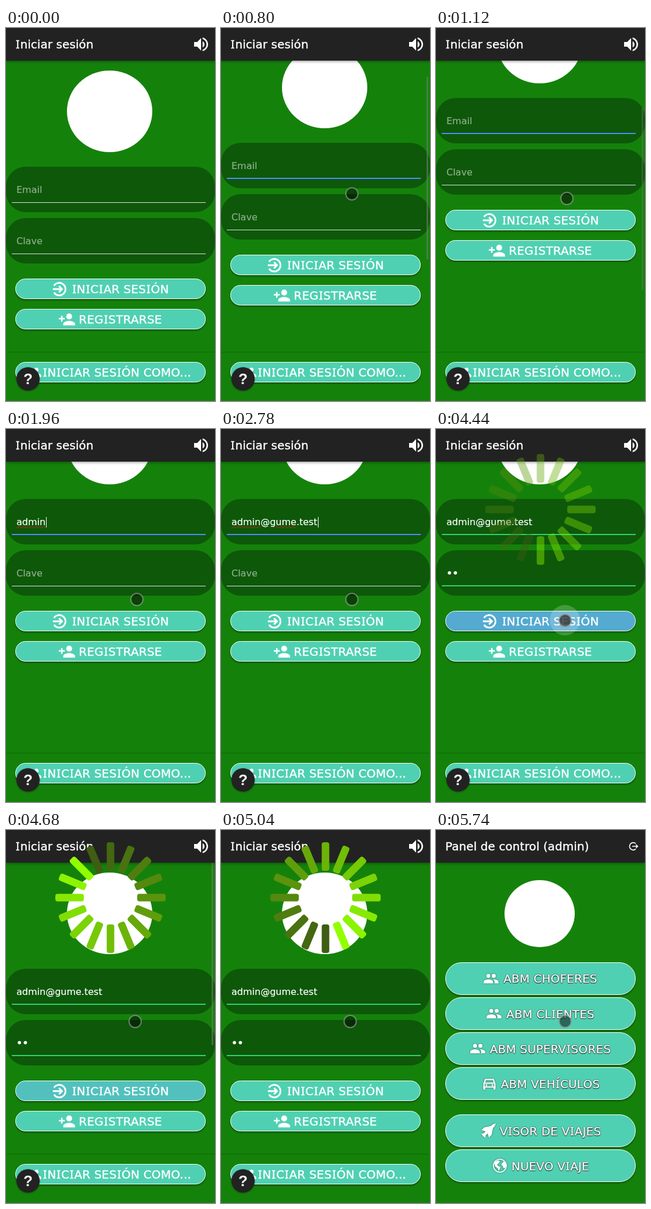
An HTML page that plays this animation: 360 px wide and 640 px high, repeating every 5.78 s.

```html
<!DOCTYPE html>
<html lang="es">
<head>
<meta charset="utf-8">
<title>Iniciar sesión</title>
<style>
html, body { margin: 0; width: 100%; height: 100%; overflow: hidden; background: #14820a; }
body { position: relative; font: 16px "DejaVu Sans", Verdana, sans-serif; color: #fff; }
div { position: absolute; box-sizing: border-box; }
svg { flex: none; overflow: visible; fill: #fff; }
.page { width: 360px; height: 640px; overflow: hidden; background: #14820a; }
.bar { width: 360px; height: 56px; padding-left: 16px; background: #222; font-size: 20px; line-height: 57px; letter-spacing: .08px;
  white-space: pre; box-shadow: 0 2px 4px #0005; -webkit-text-stroke: .4px; }
.bar svg { position: absolute; }
.logo { border-radius: 50%; background: #fff; }
.field { width: 360px; height: 78px; border-radius: 34px; background: #0e580a; }
.field p { position: absolute; left: 18px; margin: 0; line-height: 80px; white-space: pre; -webkit-text-stroke: .2px; }
.field u { text-decoration: underline wavy #e02020 1px; }
.line { left: 10px; width: 334px; }
.btn { left: 16px; width: 328px; height: 35px; border: 1px solid #fff; border-radius: 28px; background: #50d0b2;
  display: flex; align-items: center; justify-content: center; gap: 6px; font-size: 20px; letter-spacing: .2px;
  white-space: pre; box-shadow: 0 2px 3px #0006; overflow: hidden; -webkit-text-stroke: .4px; }
.tall { height: 56px; text-shadow: 0 0 1px #000, 0 0 2px #000, 0 1px 1px #000; }
.tall svg { filter: drop-shadow(0 0 1px #0009); }
b { font: 20px "Noto Sans", "DejaVu Sans", sans-serif; padding: 0 .8px; letter-spacing: 0; }
#foot { top: 557px; width: 360px; height: 83px; background: #14820a; box-shadow: 0 -1px 2px #0003; }
#help { left: 18px; top: 582px; width: 40px; height: 40px; border-radius: 50%; background: #222; text-align: center;
  font: bold 26px/41px "Liberation Sans", Arial, sans-serif; box-shadow: 0 1px 3px #0006; }
#thumb { left: 354px; width: 3px; height: 313px; background: #6b7d6999; }
#cursor { width: 23px; height: 23px; border-radius: 50%; border: 2px solid #fff6; }
#ripple { border-radius: 50%; background: #fff; }
#spin { position: absolute; left: 0; top: 0; }
</style>
</head>
<body>
<div class="page" id="login">
  <div id="scroll"></div>
  <div id="thumb"></div>
  <div id="foot"></div>
  <div class="bar" id="loginBar"></div>
  <div id="help">?</div>
</div>
<div class="page" id="panel"></div>
<div id="ripple"></div>
<div id="cursor"></div>
<svg id="spin" width="360" height="260"><g id="spokes"></g></svg>
<script>
const LOOP = 5780, EMAIL = 'admin@gume.test';
const $ = id => document.getElementById(id);

const stroke = (d, width = 2.5) => `<path d="${d}" fill="none" stroke="#fff" stroke-width="${width}"/>`;
const fill = d => `<path d="${d}"/>`;
const icons = {
  volume: fill('M3 9v6h4l5 5V4L7 9H3zm13.5 3c0-1.77-1.02-3.29-2.5-4.03v8.05c1.48-.73 2.5-2.25 2.5-4.02zM14 3.23v2.06c2.89.86 5 3.54 5 6.71s-2.11 5.85-5 6.71v2.06c4.01-.91 7-4.49 7-8.77s-2.99-7.86-7-8.77z'),
  enter: stroke('M3.2 7A9.2 9.2 0 1 1 3.2 17M1.5 12h13M10.5 7.5l4.5 4.5-4.5 4.5'),
  exit: stroke('M18 5A9.5 9.5 0 1 0 18 19M9 12h14M18.5 7.5l4.5 4.5-4.5 4.5'),
  add: fill('M15 12a4 4 0 1 0 0-8 4 4 0 0 0 0 8zM6 10V7H4v3H1v2h3v3h2v-3h3v-2zM15 14c-2.67 0-8 1.34-8 4v2h16v-2c0-2.66-5.33-4-8-4z'),
  people: fill('M16 11a3 3 0 1 0 0-6 3 3 0 0 0 0 6zM8 11a3 3 0 1 0 0-6 3 3 0 0 0 0 6zM8 13c-2.33 0-7 1.17-7 3.5V19h14v-2.5c0-2.33-4.67-3.5-7-3.5zM16 13l-1 .05c1.16.84 2 1.97 2 3.45V19h6v-2.5c0-2.33-4.67-3.5-7-3.5z'),
  car: stroke('M4 12.2L6.3 6h11.400L20 12.200V17H4zM4 11.500h16', 2) + fill('M3 16h3v5H4q-1 0-1-1zM18 16h3v4q0 1-1 1h-2z')
    + [7.5, 16.5].map(x => `<circle cx="${x}" cy="14.3" r="1.5"/>`).join(''),
  jet: fill('M23 1c-3 0-5 2-7 4L6 7l-4 4 6 2-3 3H1l3 3.500L3 21l1.500-1L8 23v-4l3-3 2 6 4-4 2-10c2-2 4-4 4-7z'),
  earth: stroke('M12 2.500a9.500 9.500 0 1 1 0 19 9.500 9.500 0 0 1 0-19z', 1.6)
    + fill('M4 7l5-3 3 1-1 3-3 2 1 2 4 2-1 3-2 3-1-4-4-3-1-3zM16 5l4 3 1 5-2 3-2-1-1-3-2-1 1-3 2-1z')
};
const icon = (name, size = 28, box = '0 0 24 24', style = '') =>
  `<svg width="${size}" height="${size}" viewBox="${box}" style="${style}">${icons[name]}</svg>`;

// Capital I gets its serifs from a second font.
const serif = s => s.replace(/[IÍ]/g, '<b>$&</b>');
const boxes = { add: '1 1 22 22', people: '1 0 24 24' };
const button = (y, name, label, cls = '', style = '') =>
  `<div class="btn ${cls}" style="top:${y}px;${style}">${icon(name, 28, boxes[name])}<span>${serif(label)}</span></div>`;
const logo = (x, y, w, h) => `<div class="logo" style="left:${x}px;top:${y}px;width:${w}px;height:${h}px"></div>`;
const field = (y, id) => `<div class="field" style="top:${y}px"><p id="${id}"></p><div class="line" id="${id}Line"></div></div>`;

$('scroll').innerHTML = logo(105, 73, 147, 140) + field(238, 'email') + field(326, 'pass')
  + button(430, 'enter', 'INICIAR SESIÓN', 'send') + button(482, 'add', 'REGISTRARSE');
$('foot').innerHTML = button(16, 'people', 'INICIAR SESIÓN COMO...', '', 'gap:0;padding-right:6px');
$('loginBar').innerHTML = serif('Iniciar sesión') + icon('volume', 32, undefined, 'left:320px;top:12px');
$('panel').innerHTML = `<div class="bar">Panel de control (admin)${icon('exit', 16, undefined, 'left:332px;top:20px')}</div>`
  + logo(118, 86, 121, 115)
  + [[227, 'people', 'ABM CHOFERES'], [287, 'people', 'ABM CLIENTES'], [347, 'people', 'ABM SUPERVISORES'],
     [407, 'car', 'ABM VEHÍCULOS'], [488, 'jet', 'VISOR DE VIAJES'], [548, 'earth', 'NUEVO VIAJE']]
    .map(b => button(...b, 'tall')).join('');
$('spokes').innerHTML = Array.from({ length: 16 }, (_, i) =>
  `<rect x="46" y="-6.5" width="49" height="13" rx="4" transform="rotate(${i * 22.5})"/>`).join('');

const send = document.querySelector('.send'), spokes = [...$('spokes').children];
const ramp = (t, a, b) => Math.min(1, Math.max(0, (t - a) / (b - a)));
const out = x => 1 - (1 - x) ** 3;
const smooth = x => x * x * (3 - 2 * x);
const mix = (a, b, k) => `rgb(${a.map((v, i) => Math.round(v + (b[i] - v) * k))})`;

function setField(id, hint, text, focus, done) {
  const html = text || `<span style="color:#ffffff80">${hint}</span>`;
  const caret = focus && text ? '<span style="display:inline-block;width:1px;height:18px;margin-left:1px;vertical-align:-4px;background:#fff"></span>' : '';
  if ($(id).dataset.now !== html + caret) $(id).innerHTML = $(id).dataset.now = html + caret;
  const s = $(id + 'Line').style;
  s.top = focus || done ? '60px' : '61px';
  s.height = focus || done ? '2px' : '1px';
  s.background = focus ? '#4c8dff' : done ? '#2dd36f' : '#dbe6da';
}

function draw(t) {
  const scroll = Math.round(118 * (out(ramp(t, 762, 1060)) - out(ramp(t, 4450, 4650))));
  $('scroll').style.top = -scroll + 'px';
  $('thumb').style.top = 56 + scroll * .69 + 'px';
  $('thumb').style.opacity = t < 2000 ? (t > 762) * (1 - ramp(t, 1070, 1200)) : (t > 4450) * (1 - ramp(t, 4750, 4900));

  const typed = EMAIL.slice(0, Math.max(0, Math.floor((t - 1560) / 80)));
  const onEmail = t >= 620 && t < 3000;
  setField('email', 'Email', onEmail ? typed.replace(/\b(admin|gume)\b/g, '<u>$1</u>') : typed, onEmail, t >= 3000);
  const dots = (t >= 3420) + (t >= 3600);
  setField('pass', 'Clave', dots ? `<span style="font-weight:bold">${'•'.repeat(dots)}</span>` : '', t >= 3000 && t < 4360, t >= 4360);

  const press = ramp(t, 4360, 4440) * (1 - ramp(t, 4560, 4760));
  send.style.background = mix([80, 208, 178], [84, 170, 208], press);

  const move = smooth(ramp(t, 20, 540)), drift = ramp(t, 800, 1100), down = smooth(ramp(t, 3660, 4000));
  const x = 347 - 121.5 * move - 3 * down;
  const y = 38 + 246.5 * move + 8 * drift + 36 * down;
  const c = $('cursor').style;
  c.opacity = t >= 20 ? 1 : 0;
  c.transform = `translate(${x - 11.5}px,${y - 11.5}px)`;
  c.background = t >= 4360 && t < 4520 ? '#333c' : '#00000080';

  const r = 10 + 16 * ramp(t, 4360, 4440) + 14 * ramp(t, 4440, 4540), rs = $('ripple').style;
  rs.width = rs.height = 2 * r + 'px';
  rs.left = 222 - r + 'px';
  rs.top = 328 - r + 'px';
  rs.opacity = t >= 4360 ? .2 * (1 - ramp(t, 4460, 4560)) : 0;

  const shown = ramp(t, 4380, 4530);
  $('spin').style.opacity = shown * (1 - ramp(t, 5080, 5200));
  $('spokes').setAttribute('transform', `translate(180 ${116 + 37 * (1 - shown)})`);
  const head = 3 + (t - 5040) / 40;
  spokes.forEach((s, i) => {
    const age = (((head - i) % 16) + 16) % 16;
    s.setAttribute('fill', mix([58, 82, 20], [146, 255, 0], 1 - age / 16));
  });

  const enter = out(ramp(t, 5060, 5240));
  $('panel').style.opacity = enter;
  $('panel').style.transform = `translateY(${40 * (1 - enter)}px)`;
}

const start = performance.now();
function tick() {
  draw((performance.now() - start) % LOOP);
  requestAnimationFrame(tick);
}
tick();
</script>
</body>
</html>
```
